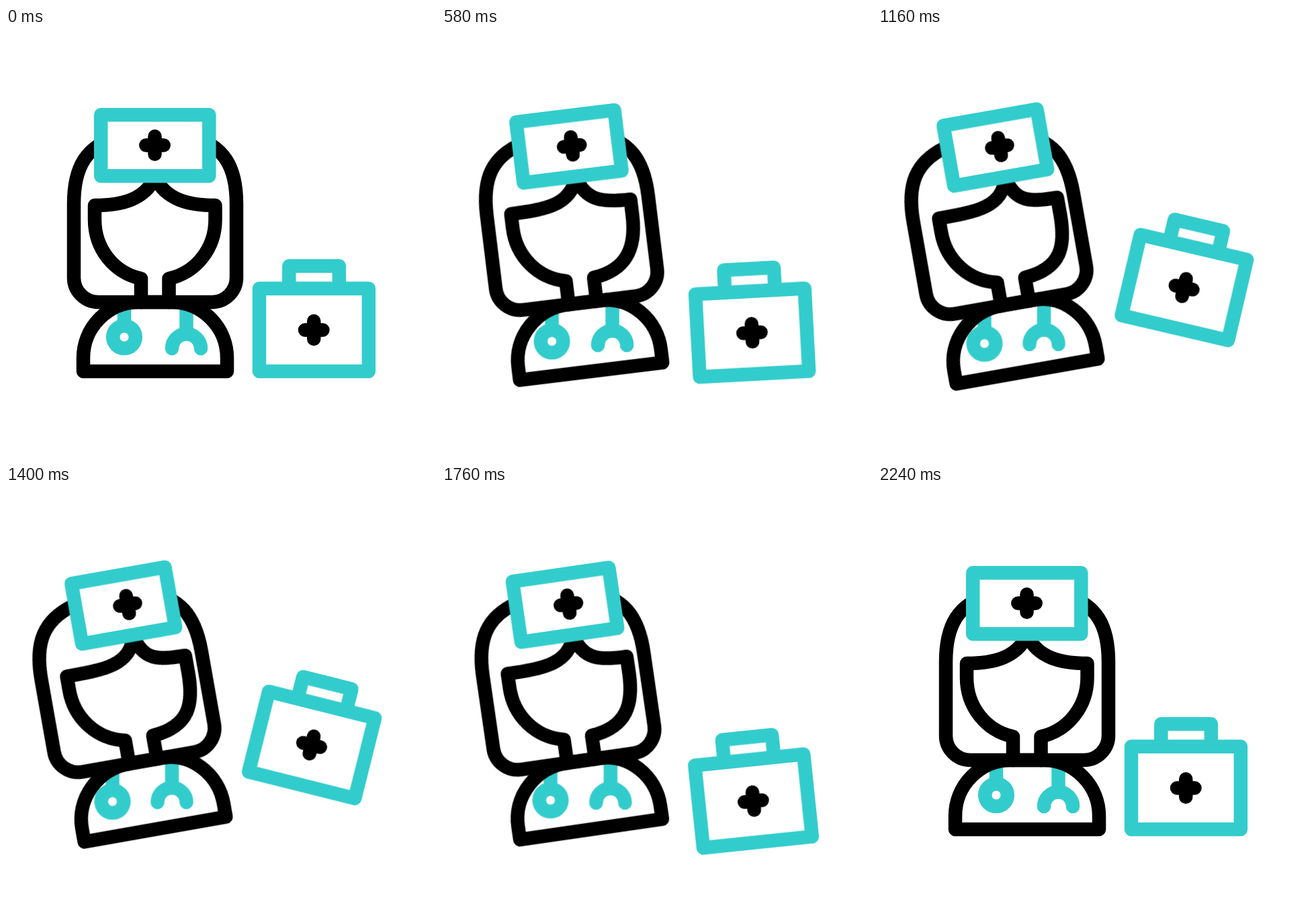
Write an HTML page without scripts that moves like this. It is 640 px wide and 640 px high and loops after 2400 ms.

```html
<!DOCTYPE html>
<html lang="en">
<head>
<meta charset="utf-8">
<title>Nurse and first aid bag</title>
<style>
  html, body { margin: 0; width: 100%; height: 100%; overflow: hidden; background: #fff; }
  svg { display: block; width: 100vw; height: 100vh; }

  path, circle {
    fill: none;
    stroke: #000;
    stroke-width: 20.5;
    stroke-linecap: round;
    stroke-linejoin: round;
  }
  .teal { stroke: #3cc; }
  .flat { stroke-linecap: butt; }
  .solid { fill: #fff; }

  .move, .morph, #bag {
    animation: 2.4s cubic-bezier(.333, 0, .667, 1) infinite;
  }
  .move { animation-name: move; }
  .morph { animation-name: morph; }
  #bag { animation-name: hop; transform-origin: 458.5px 449.5px; }

  /* rest, lean left, hold, return */
  @keyframes move {
    0%, 8.333%, 91.667%, 100% { transform: var(--from); }
    33.333%, 66.667% { transform: var(--to); }
  }
  @keyframes morph {
    0%, 8.333%, 91.667%, 100% { d: var(--from); }
    33.333%, 66.667% { d: var(--to); }
  }
  @keyframes hop {
    0%, 16.667%, 87.5%, 100% { transform: translate(0px, 0px) rotate(0deg); }
    33.333% { transform: translate(7.5px, 9.5px) rotate(-7.1deg); }
    54.167% { transform: translate(-5px, -80px) rotate(17.9deg); }
    70.833% { transform: translate(5.5px, 20.8px) rotate(-6.3deg); }
  }

  #nurse, #disc, #fork { --from: rotate(0deg); }
  #nurse { --to: rotate(-10deg); transform-origin: 222px 511px; }
  #disc { --to: rotate(10deg); transform-origin: 176px 406px; }
  #fork { --to: rotate(10deg); transform-origin: 268.5px 391px; }

  #hair, #badge { --from: translate(0px, 0px); }
  #hair { --to: translate(-7.2px, 0px); }
  #badge { --to: translate(18.2px, 0px); }

  #body {
    --from: path("M115 511V491A83 83 0 0 1 198 408H246A83 83 0 0 1 329 491V511Z");
    --to: path("M115 511V491A87 83 0 0 1 202 408H250A79 83 0 0 1 329 491V511Z");
  }
  #face {
    --from: path("M201 408V373C160 364 132 328 132 285V264C172 264 206 256 222 222C238 256 272 264 311.5 264V285C311.5 328 283 364 242.5 373V408");
    --to: path("M201 408V373C160 364 132 328 132 285V264C190 264 228 264 240 222C248 260 270 264 311 264V285C312 338 299 369 243 373V408");
  }
  #cap {
    --from: path("M141.2 129.2H302.3V220.3H141.2Z");
    --to: path("M162.7 129.2H304V220.3H162.7Z");
  }
  #bar {
    --from: path("M208.3 174.5H234.7");
    --to: path("M209.8 174.5H233.2");
  }
</style>
</head>
<body>
<svg viewBox="0 0 640 640">
  <g id="nurse" class="move">
    <g id="disc" class="move">
      <path class="teal flat" d="M176 410V445"/>
      <circle class="teal" cx="176" cy="460" r="16.8"/>
    </g>
    <g id="fork" class="move">
      <path class="teal flat" d="M268.5 410V457"/>
      <path class="teal" d="M247 477A21.5 21.5 0 0 1 290 477"/>
    </g>
    <path id="body" class="morph" d="M115 511V491A83 83 0 0 1 198 408H246A83 83 0 0 1 329 491V511Z"/>
    <path id="hair" class="move" d="M165 162.5C120 176 101 206 101 262V371A36.5 36.5 0 0 0 137.5 408H306.5A36.5 36.5 0 0 0 343 371V262C343 206 324 176 279 162.5"/>
    <path id="face" class="morph" d="M201 408V373C160 364 132 328 132 285V264C172 264 206 256 222 222C238 256 272 264 311.5 264V285C311.5 328 283 364 242.5 373V408"/>
    <path id="cap" class="teal solid morph" d="M141.2 129.2H302.3V220.3H141.2Z"/>
    <g id="badge" class="move">
      <path id="bar" class="morph" d="M208.3 174.5H234.7"/>
      <path d="M221.5 161.3V187.7"/>
    </g>
  </g>
  <g id="bag">
    <path class="teal" d="M421.3 387.7V354.3H495.8V387.7"/>
    <path class="teal solid" d="M377 387.7H539.8V511H377Z"/>
    <path d="M445 449.5H471.4M458.2 436.3V462.7"/>
  </g>
</svg>
</body>
</html>
```
